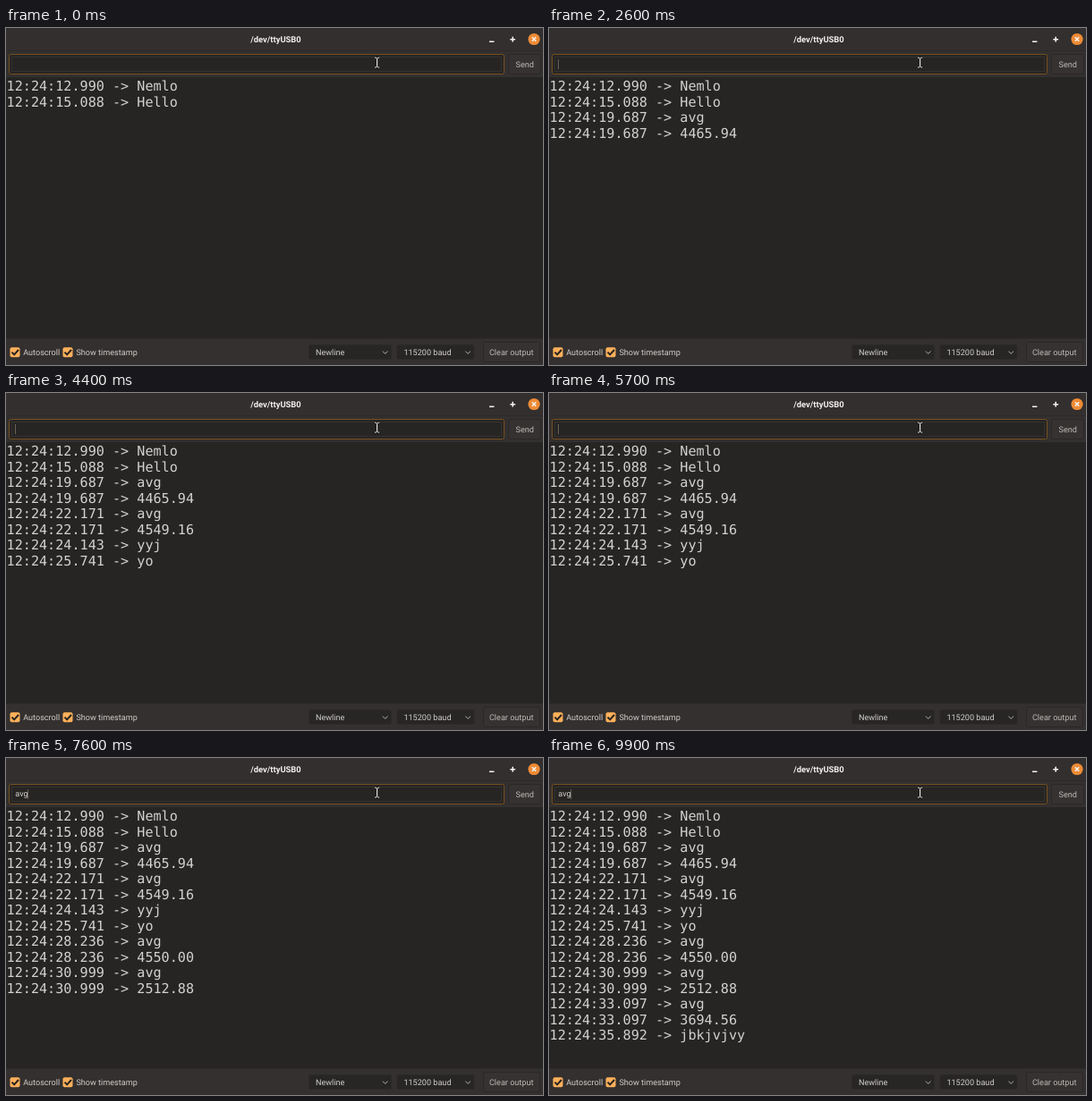
An HTML page that plays this animation: 600x377 px, repeating every 10000 ms.

```html
<!DOCTYPE html>
<html lang="en">
<head>
<meta charset="utf-8">
<title>Serial monitor</title>
<style>
  html, body { margin: 0; width: 100%; height: 100%; overflow: hidden; background: #33302f; }
  svg { display: block; width: 600px; height: 377px; }
  text { font: 400 9.1px Roboto, "Open Sans", sans-serif; fill: #d0cdca; text-rendering: geometricPrecision; white-space: pre; }
  .title { font-size: 9.4px; font-weight: 700; fill: #f2f0ee; text-anchor: middle; }
  .mid { text-anchor: middle; fill: #bdb9b6; }
  #log text { font: 15.14px "DejaVu Sans Mono", monospace; fill: #d4d2cf; }
  .button { fill: #353231; stroke: #2a2827; }
  .combo { fill: #282625; stroke: #2c2a29; }
  .line { fill: none; stroke: #b5b2af; }
  .window { fill: none; stroke: #f2f0ee; stroke-width: 1.6; }
</style>
</head>
<body>
<svg viewBox="0 0 600 377">
  <defs><path id="beam" d="M412 33q2.6 0 2.6 1.6v8q0 1.6-2.6 1.6M417.2 33q-2.6 0-2.6 1.6v8q0 1.6 2.6 1.6" fill="none"/></defs>
  <rect width="600" height="377" fill="#33302f"/>
  <rect width="600" height="25" fill="#322f2e"/>
  <path d="M0 25.5H600" stroke="#2d2a29"/>
  <text class="title" x="301.5" y="15.5">/dev/ttyUSB0</text>
  <path class="window" d="M540 15.3h5.4M563.3 12.7h5.8M566.2 9.8v5.8"/>
  <circle cx="590" cy="12.5" r="6.6" fill="#ee8b35"/>
  <path class="window" d="M587.8 10.3l4.4 4.4m0-4.4l-4.4 4.4" stroke-width="1.3"/>

  <rect x="3.5" y="29.5" width="553" height="22" rx="2" fill="#272523" stroke="#76501f"/>
  <rect x="6.5" y="32.5" width="547" height="16" fill="none" stroke="#4a4643" stroke-width=".8" stroke-dasharray="1 1"/>
  <text id="field" x="10.3" y="43.4"></text>
  <path id="caret" d="M0 35v11" stroke="#65615e"/>
  <rect class="button" x="561.5" y="29.5" width="36" height="22" rx="2"/>
  <text class="mid" x="579.8" y="43.5">Send</text>

  <rect y="55" width="600" height="292" fill="#262524"/>
  <g id="log"></g>

  <path d="M0 347.5H600" stroke="#2d2b29"/>
  <g id="checks"></g>
  <g id="combos"></g>
  <rect class="button" x="533.5" y="351.5" width="63" height="22" rx="2"/>
  <text class="mid" x="564.7" y="365.7">Clear output</text>

  <use href="#beam" stroke="#111" stroke-width="2.4"/>
  <use href="#beam" stroke="#eee"/>
</svg>
<script>
const LOOP = 10000;
const $ = id => document.getElementById(id);

const entries = [
  "12.990 Nemlo", "15.088 Hello",
  "19.687 avg", "19.687 4465.94",
  "22.171 avg", "22.171 4549.16",
  "24.143 yyj", "25.741 yo",
  "28.236 avg", "28.236 4550.00",
  "30.999 avg", "30.999 2512.88",
  "33.097 avg", "33.097 3694.56",
  "35.892 jbkjvjvy"
];

// time in ms, field text, visible log lines, caret shown
const steps = [
  [0, "", 2, 0], [400, "", 2, 1],
  [900, "a", 2, 1], [1000, "av", 2, 1], [1100, "avg", 2, 1],
  [1400, "", 2, 1], [1500, "", 4, 1],
  [2000, "a", 4, 1], [2100, "avg", 4, 1],
  [2600, "", 4, 1], [2700, "", 6, 1],
  [3200, "y", 6, 1], [3300, "yy", 6, 1], [3400, "yyj", 6, 1],
  [3500, "", 6, 1], [3600, "", 7, 1],
  [4100, "y", 7, 1], [4200, "yo", 7, 1],
  [4300, "", 7, 1], [4400, "", 8, 1],
  [4800, "a", 8, 1], [5100, "av", 8, 1], [5200, "avg", 8, 1],
  [5700, "", 8, 1], [5800, "", 10, 1], [6400, "", 10, 0],
  [6800, "av", 10, 1], [6900, "avg", 10, 1], [7000, "", 12, 1],
  [7500, "a", 12, 1], [7600, "avg", 12, 1],
  [8000, "", 12, 1], [8100, "", 14, 1], [8700, "", 14, 0],
  [8900, "j", 14, 1], [9000, "jb", 14, 1], [9100, "jbkj", 14, 1],
  [9200, "jbkjv", 14, 1], [9300, "jbkjvjv", 14, 1], [9400, "jbkjvjvy", 14, 1],
  [9500, "", 14, 1], [9600, "", 15, 1], [9900, "avg", 15, 1]
];

$("log").innerHTML = entries.map((entry, i) => {
  const [seconds, message] = entry.split(" ");
  return `<text x=".6" y="${70 + i * 17.53}">12:24:${seconds} -&gt; ${message}</text>`;
}).join("");

$("checks").innerHTML = [[4.5, "Autoscroll", 19.2], [63.5, "Show timestamp", 78.4]].map(([x, label, textX]) =>
  `<rect x="${x}" y="357.3" width="11" height="11" rx="2" fill="#ffb05a"/>
   <path d="M${x + 2} 362.6l2.7 2.8 4.8-5.4" fill="none" stroke="#25211f" stroke-width="2"/>
   <text x="${textX}" y="365.7">${label}</text>`).join("");

$("combos").innerHTML = [[338.5, 92, "Newline"], [437, 86, "115200 baud"]].map(([x, width, label]) =>
  `<rect class="combo" x="${x}" y="354.5" width="${width}" height="16" rx="2"/>
   <text x="${x + 7.4}" y="365.7">${label}</text>
   <path class="line" d="M${x + width - 9.6} 361.6l2.8 2.8 2.8-2.8"/>`).join("");

const logLines = [...$("log").children];
let shown;

function draw() {
  const time = performance.now() % LOOP;
  const step = steps.findLast(([start]) => start <= time);
  if (step !== shown) {
    const [, typed, count, caretOn] = shown = step;
    $("field").textContent = typed;
    const end = typed ? 10.3 + $("field").getComputedTextLength() : 10.5;
    $("caret").setAttribute("transform", `translate(${end} 0)`);
    $("caret").style.opacity = caretOn;
    logLines.forEach((line, i) => line.style.display = i < count ? "" : "none");
  }
  requestAnimationFrame(draw);
}
draw();
</script>
</body>
</html>
```
